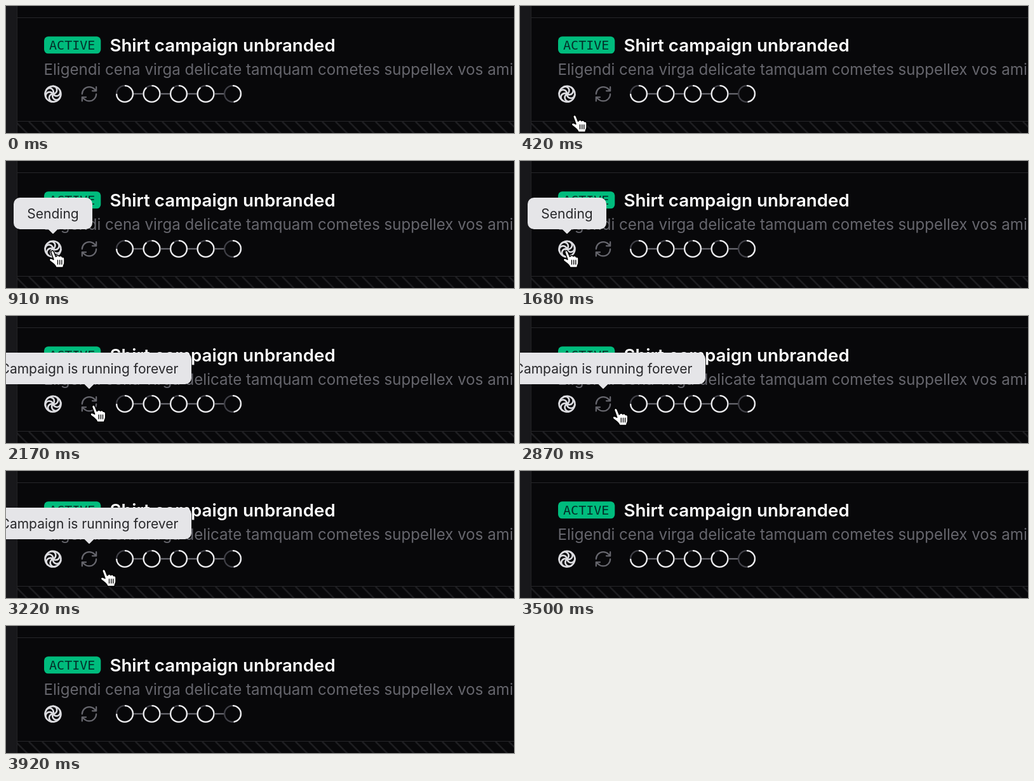
These frames come from a looping animation (800x201 px, 3990 ms). An HTML page:

```html
<!DOCTYPE html>
<html lang="en">
<head>
<meta charset="utf-8">
<title>Campaign row</title>
<style>
  html, body { margin: 0; width: 100%; height: 100%; overflow: hidden; background: #08080a; }
  svg { display: block; }
  text { font-family: Inter, sans-serif; font-optical-sizing: none; white-space: pre; }
  .title { font-size: 27.7px; font-weight: 600; fill: #fff; }
  .about { font-size: 24.1px; fill: #66666d; }
  .badge { font: 20px "DejaVu Sans Mono", monospace; fill: #03302a; text-anchor: middle; }
  .tip rect, .tip path { fill: #e5e5e8; }
  .tip text { font-size: 21px; fill: #27272a; text-anchor: middle; }
  .line { fill: none; stroke-linecap: round; stroke-linejoin: round; }
</style>
</head>
<body>
<svg id="stage" width="800" height="201" viewBox="0 0 800 201">
  <rect width="800" height="201" fill="#08080a"/>
  <path id="hatch" stroke="#1e1e21" stroke-width="2.6"/>
  <path d="M17 18.5H800M17 182.5H800" stroke="#27272a"/>
  <rect width="17" height="201" fill="#18181b"/>
  <path d="M17.5 0V201" stroke="#222225"/>

  <rect x="60" y="48.3" width="89.3" height="27" rx="6.500" fill="#00bc7d"/>
  <text class="badge" x="104.2" y="69">ACTIVE</text>
  <text class="title" x="163.4" y="72">Shirt campaign unbranded</text>
  <text class="about" x="59.500" y="109">Eligendi cena virga delicate tamquam cometes suppellex vos amicitia</text>

  <g id="pinwheel" class="line" stroke="#dcdce0" stroke-width="2.2">
    <path d="M22 12a1 1 0 0 1-10 0 1 1 0 0 0-10 0"/>
    <path d="M7 20.7a1 1 0 1 1 5-8.7 1 1 0 1 0 5-8.6"/>
    <path d="M7 3.3a1 1 0 1 1 5 8.6 1 1 0 1 0 5 8.6"/>
    <circle cx="12" cy="12" r="10"/>
  </g>
  <g class="line" stroke="#66666d" stroke-width="1.8" transform="translate(131 139.3) scale(1.24) translate(-12 -12)">
    <path d="M3 12a9 9 0 0 1 9-9 9.75 9.75 0 0 1 6.74 2.74L21 8M21 3v5h-5"/>
    <path d="M21 12a9 9 0 0 1-9 9 9.75 9.75 0 0 1-6.74-2.74L3 16M8 16H3v5"/>
  </g>
  <g id="steps" fill="none" stroke-width="2.3"></g>
  <g id="tips"></g>

  <g id="hand" class="line">
    <path fill="#fff" stroke="#000" stroke-width="1.5" d="M-2 2C-3-1 1-3 2.500 1L5.500 8.500C7 6 10 6 11 8C12.500 6.500 15 7 15.500 9C17.500 8.500 19 10 19 12V18C19 21 17 22 17 25.500H6C5 21 1 19-4 15C-6 12-3 10 0 12L2 13Z"/>
    <path stroke="#000" stroke-width="1.3" d="M8.500 14V20.500M11.700 14V20.500M14.800 14V20.500"/>
  </g>
</svg>
<script>
const LOOP = 3990, STEP = 70, SPIN = 980, START_ANGLE = 30;
const byId = id => document.getElementById(id);

function add(parent, tag, attrs, text = "") {
  const node = document.createElementNS("http://www.w3.org/2000/svg", tag);
  for (const name in attrs) node.setAttribute(name, attrs[name]);
  node.textContent = text;
  parent.append(node);
  return node;
}

let hatch = "";
for (let x = -6; x < 800; x += 21) hatch += `M${x} 183l20 20`;
byId("hatch").setAttribute("d", hatch);

// Progress rings, filled clockwise from the top
[0.75, 0.89, 0.9, 0.89, 0.48].forEach((share, i) => {
  const cx = 187 + i * 42.5, cy = 139, r = 12.9, steps = byId("steps");
  if (i) add(steps, "path", { d: `M${cx - 28.5} ${cy}h15`, stroke: "#66666d" });
  add(steps, "circle", { cx, cy, r, stroke: "#3f3f46" });
  add(steps, "circle", {
    cx, cy, r, stroke: "#ececee", pathLength: 1,
    "stroke-dasharray": `${share} 1`, transform: `rotate(-90 ${cx} ${cy})`
  });
});

function makeTip(cx, width, label, from, to) {
  const node = add(byId("tips"), "g", { class: "tip" });
  add(node, "rect", { x: cx - width / 2, y: 58, width, height: 50, rx: 10 });
  add(node, "path", { d: `M${cx - 8} 107.500h16l-7 7q-1 1-2 0z` });
  add(node, "text", { x: cx, y: 91 }, label);
  return { node, from, to };
}
const tips = [
  makeTip(74, 124, "Sending", 630, 2030),
  makeTip(131, 322, "Campaign is running forever", 2030, 3290)
];

// Pointer path: time, x, y of the fingertip
const path = [
  [0, 94, 215], [280, 92, 206], [420, 86, 174], [560, 77, 153], [700, 73, 143],
  [1750, 73, 143], [1890, 85, 142], [2100, 132, 141], [2310, 149, 145],
  [2450, 150, 146], [3010, 151, 148], [3220, 154, 157], [3360, 161, 206], [LOOP, 161, 215]
];

function pointerAt(t) {
  const i = path.findIndex(key => key[0] > t);
  const [t0, x0, y0] = path[i - 1], [t1, x1, y1] = path[i];
  const k = (t - t0) / (t1 - t0);
  return [x0 + (x1 - x0) * k, y0 + (y1 - y0) * k];
}

function draw(now) {
  const t = Math.floor((now % LOOP) / STEP) * STEP;
  const angle = START_ANGLE + 360 * t / SPIN;
  byId("pinwheel").setAttribute("transform",
    `translate(74 139.3) rotate(${angle}) scale(1.24) translate(-12 -12)`);
  for (const { node, from, to } of tips) {
    node.setAttribute("visibility", t >= from && t < to ? "visible" : "hidden");
  }
  byId("hand").setAttribute("transform", `translate(${pointerAt(t)})`);
}

const start = performance.now();
function tick() {
  draw(performance.now() - start);
  requestAnimationFrame(tick);
}
tick();
</script>
</body>
</html>
```
